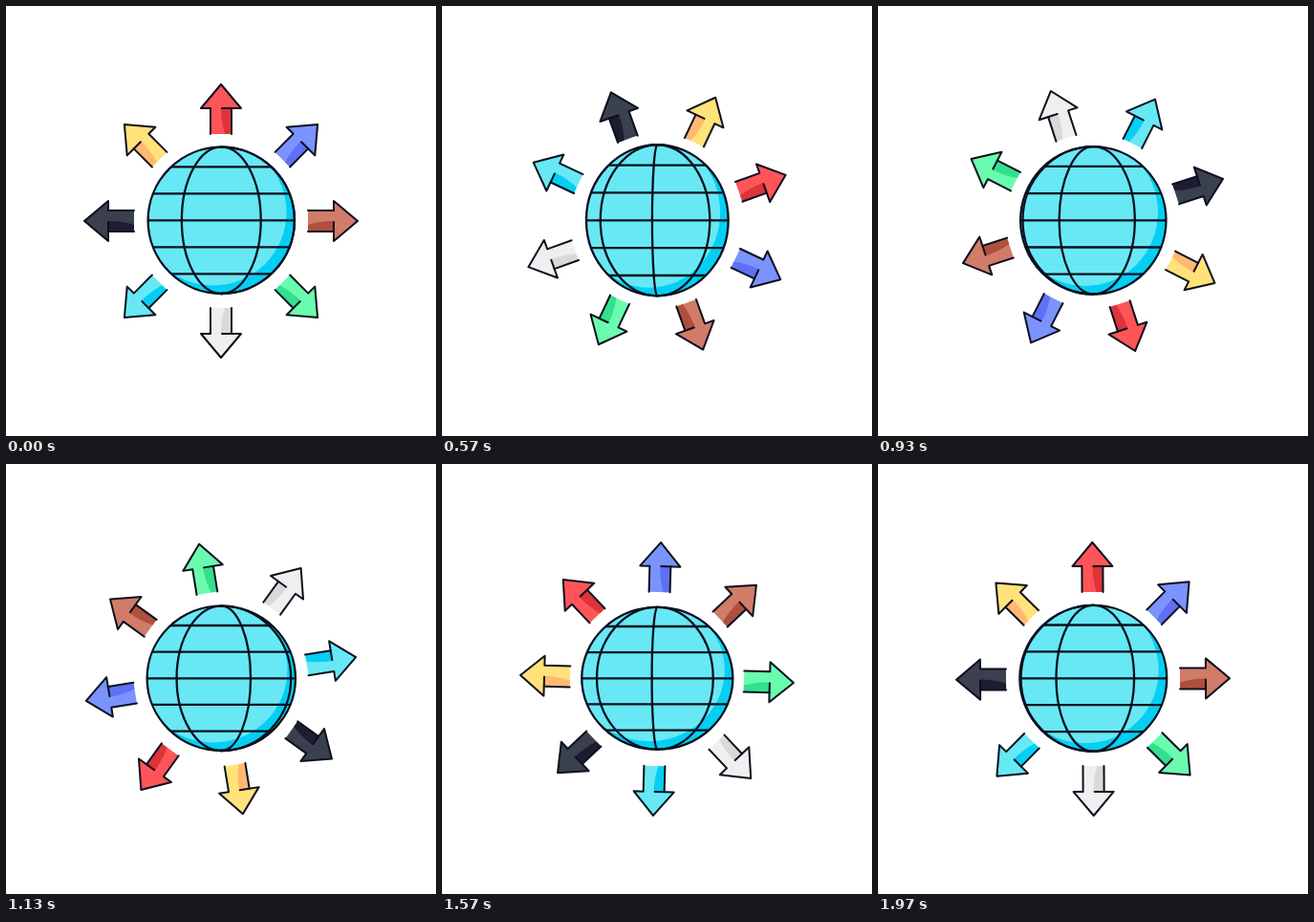
Write an HTML page with a canvas that moves like this. It is 450 by 450 pixels and loops after 2000 ms.

```html
<!DOCTYPE html>
<html>
<head>
<meta charset="utf-8">
<style>
html, body { margin: 0; width: 100%; height: 100%; overflow: hidden; background: #fff; }
canvas { display: block; }
</style>
</head>
<body>
<canvas id="stage" width="450" height="450"></canvas>
<script>
const ctx = document.getElementById('stage').getContext('2d');
const INK = '#0b0f1e', LIGHT = '#68e8f4', DEEP = '#04cff2';
const TAU = Math.PI * 2, FRAMES = 60;

// Clockwise from the top: fill and shade
const arrows = [
  ['#ff5559', '#dc3439'], ['#7b93fc', '#5f70f4'],
  ['#d07c68', '#ad503e'], ['#6bfbae', '#33e08d'],
  ['#efefef', '#d9d9d9'], [LIGHT, DEEP],
  ['#3a404e', '#1c1d33'], ['#ffe27a', '#ffb970']
];

const lerp = (a, b, p) => a + (b - a) * p;
const smooth = p => p * p * (3 - 2 * p);

function line(...pts) {
  ctx.beginPath();
  for (let i = 0; i < pts.length; i += 2) ctx.lineTo(pts[i], pts[i + 1]);
}

function ellipse(x, y, rx, ry, from = 0, to = TAU) {
  ctx.beginPath();
  ctx.ellipse(x, y, rx, ry, 0, from, to);
}

function drawArrow([fill, shade], angle, side) {
  const tip = -143, base = -118, tail = -91;
  ctx.save();
  ctx.translate(225, 225);
  ctx.rotate(angle);
  ctx.scale(side, 1);
  line(-11, tail, -11, base, -21, base, 0, tip, 21, base, 11, base, 11, tail);
  ctx.fillStyle = fill;
  ctx.fill();
  ctx.beginPath();
  ctx.moveTo(0, base);
  ctx.lineTo(11, base);
  ctx.lineTo(11, tail);
  ctx.lineTo(4, tail);
  ctx.quadraticCurveTo(0, -104, 0, base);
  ctx.fillStyle = shade;
  ctx.fill();
  ctx.lineWidth = 2;
  line(-11, tail, -11, base, -21, base, 0, tip, 21, base, 1, base);
  ctx.stroke();
  line(11, tail, 11, base);
  ctx.stroke();
  ctx.restore();
}

function drawGlobe(p) {
  const wobble = 2.4 * Math.sin(p * TAU);
  const rx = 76.7 - wobble, ry = 76.7 + wobble;
  ctx.save();
  ctx.translate(225.3, 224.3);
  ctx.lineWidth = 2.3;

  ctx.save();
  ellipse(0, 0, rx, ry);
  ctx.clip();
  ctx.fillStyle = DEEP;
  ctx.fill();
  ellipse(-8.5, -8.5, rx, ry);
  ctx.fillStyle = LIGHT;
  ctx.fill();
  for (let i = -2; i <= 2; i++) {
    const y = i * ry * 0.365;
    line(-rx, y, rx, y);
    ctx.stroke();
  }
  ctx.restore();

  // Each meridian slides to the next one's place twice per loop
  const stops = [1, 0.54, -0.54, -1], turn = p * 2 % 1;
  for (let i = 0; i < 3; i++) {
    const u = lerp(stops[i], stops[i + 1], turn);
    const from = u > 0 ? -Math.PI / 2 : Math.PI / 2;
    ellipse(0, 0, Math.abs(u) * rx, ry, from, from + Math.PI);
    ctx.stroke();
  }
  ellipse(0, 0, rx, ry);
  ctx.stroke();
  ctx.restore();
}

function draw(now) {
  // 30 frames a second, with starts rounded to 10 ms
  const t = now % 2000, rest = t % 100;
  const frame = Math.floor(t / 100) * 3 + (rest >= 30) + (rest >= 70);
  const p = frame / FRAMES;
  ctx.fillStyle = '#fff';
  ctx.fillRect(0, 0, 450, 450);
  ctx.strokeStyle = INK;
  ctx.lineCap = ctx.lineJoin = 'round';
  arrows.forEach((colors, i) =>
    drawArrow(colors, (smooth(p) + i / 8) * TAU, i < 4 ? 1 : -1));
  drawGlobe(p);
}

const start = performance.now();
function tick() {
  draw(performance.now() - start);
  requestAnimationFrame(tick);
}
tick();
</script>
</body>
</html>
```
